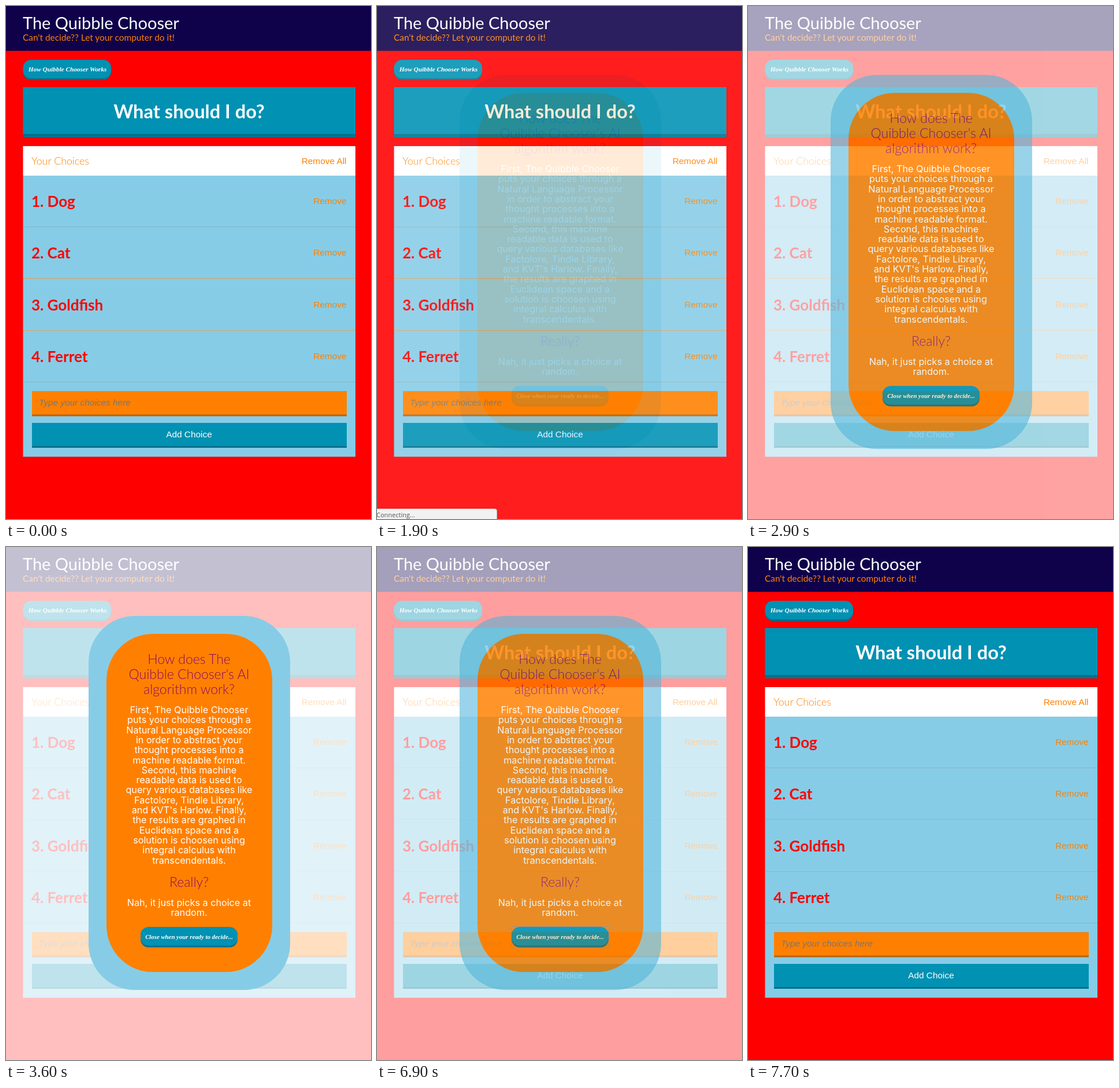
These frames come from a looping animation (632x886 px, 8 s). An HTML page:

```html
<!DOCTYPE html>
<html lang="en">
<head>
<meta charset="utf-8">
<title>Quibble Chooser</title>
<style>
  html, body { margin: 0; width: 100%; height: 100%; overflow: hidden; background: #f00; }
  svg { display: block; width: 100vw; height: 100vh; }
  text { white-space: pre; }
  .title { font-family: Lato, sans-serif; }
  .thin { font-family: Lato, sans-serif; font-weight: 300; }
  .bold { font-family: Lato, sans-serif; font-weight: 700; }
  .script { font: italic 700 11px "Liberation Serif", serif; }
  .ui { font: 15.4px "Liberation Sans", Arial, sans-serif; }
  .hint { font-style: italic; }
  .body { font: 400 16.2px Inter, sans-serif; }
  .status { font: 11px "Open Sans", sans-serif; }
  .mid { text-anchor: middle; }
  .end { text-anchor: end; }
</style>
</head>
<body>
<svg viewBox="0 0 632 886">
  <g id="page"></g>
  <g id="overlay" opacity="0"></g>
  <g id="status" visibility="hidden"></g>
</svg>
<script>
const LOOP = 8000, STEP = 100;
const NAVY = '#10024a', TEAL = '#0091b3', DEEP = '#00708c', SKY = '#87cce6',
      ORANGE = '#ff8000', PLUM = '#8c0a64', RED = '#f00', WHITE = '#fff';

const $ = id => document.getElementById(id);
const page = $('page'), overlay = $('overlay'), status = $('status');

function add(parent, tag, attrs, content = '') {
  const el = document.createElementNS('http://www.w3.org/2000/svg', tag);
  for (const key in attrs) el.setAttribute(key, attrs[key]);
  el.textContent = content;
  parent.appendChild(el);
  return el;
}

const rect = (parent, x, y, width, height, fill, rx = 0) =>
  add(parent, 'rect', { x, y, width, height, fill, rx });

function text(parent, content, x, y, fill, cls, size) {
  const el = add(parent, 'text', { x, y, fill, class: cls }, content);
  if (size) el.style.fontSize = size + 'px';
}

// Box with a darker bottom edge
function button(parent, x, y, w, h, edge, fill = TEAL, dark = DEEP, r = 0) {
  rect(parent, x, y, w, h, dark, r);
  rect(parent, x, y, w, h - edge, fill, r);
}

function drawPage() {
  rect(page, 0, 0, 632, 886, RED);
  rect(page, 0, 0, 632, 77.5, NAVY);
  text(page, 'The Quibble Chooser', 29, 40, WHITE, 'title', 29);
  text(page, "Can't decide?? Let your computer do it!", 29, 60, ORANGE, 'title', 15.4);

  button(page, 29.5, 93, 152.5, 35, 3, TEAL, DEEP, 14);
  text(page, 'How Quibble Chooser Works', 106.5, 113, WHITE, 'script mid', 11.3);

  button(page, 29.5, 140, 575.5, 87, 6);
  text(page, 'What should I do?', 317, 194, WHITE, 'bold mid', 32.6);

  rect(page, 29.5, 242, 575.5, 51, WHITE);
  rect(page, 29.5, 293, 575.5, 485.5, SKY);
  text(page, 'Your Choices', 44, 274, ORANGE, 'thin', 17.8);
  text(page, 'Remove All', 589.5, 273, ORANGE, 'ui end');

  ['Dog', 'Cat', 'Goldfish', 'Ferret'].forEach((name, i) => {
    const y = i * 89.3;
    text(page, `${i + 1}. ${name}`, 44, 347 + y, RED, 'bold', 26);
    text(page, 'Remove', 589.5, 342 + y, ORANGE, 'ui end');
    rect(page, 29.5, Math.round(381 + y), 575.5, 1, i % 3 ? '#d9a263' : '#86b4c5');
  });

  button(page, 45, 665.5, 545, 43, 3, ORANGE, '#b8640e');
  text(page, 'Type your choices here', 57, 690, '#7a7570', 'ui hint');
  button(page, 45, 720, 545, 43, 3);
  text(page, 'Add Choice', 317, 745, WHITE, 'ui mid');
}

function drawOverlay() {
  rect(overlay, 0, 0, 632, 886, 'rgba(255,255,255,.75)');
  rect(overlay, 143, 119, 349, 646, SKY, 80);
  rect(overlay, 174, 150, 287, 584, ORANGE, 80);

  const lines = (list, y, gap, fill, cls, size) => list.forEach((line, i) =>
    text(overlay, line, 317, y + i * gap, fill, cls + ' mid', size));

  lines(['How does The', "Quibble Chooser's AI", 'algorithm work?'], 202, 26, PLUM, 'thin', 23);
  lines([
    'First, The Quibble Chooser', 'puts your choices through a', 'Natural Language Processor',
    'in order to abstract your', 'thought processes into a', 'machine readable format.',
    'Second, this machine', 'readable data is used to', 'query various databases like',
    'Factolore, Tindle Library,', "and KVT's Harlow. Finally,", 'the results are graphed in',
    'Euclidean space and a', 'solution is choosen using', 'integral calculus with',
    'transcendentals.'
  ], 287, 17.3, WHITE, 'body');
  lines(['Really?'], 587, 0, PLUM, 'thin', 23);
  lines(['Nah, it just picks a choice at', 'random.'], 620, 17.3, WHITE, 'body');

  button(overlay, 233, 656.5, 168, 35, 3, TEAL, DEEP, 14);
  text(overlay, 'Close when your ready to decide...', 317, 677, WHITE, 'script mid', 10.8);
  return add(overlay, 'rect', { x: 232.5, y: 655.5, width: 169, height: 37,
    fill: 'none', stroke: '#7d8fa3', 'stroke-opacity': 0.75 });
}

function drawStatus() {
  add(status, 'path', { d: 'M-1 868.5H204Q207.5 868.5 207.5 872V887H-1Z',
    fill: '#f2f2f2', stroke: '#bdbdbd' });
  text(status, 'Connecting...', -1, 883, '#555', 'status');
}

// cubic-bezier(.42, 0, .58, 1)
function easeInOut(p) {
  if (p <= 0) return 0;
  if (p >= 1) return 1;
  let lo = 0, hi = 1, u = 0.5;
  for (let i = 0; i < 24; i++) {
    u = (lo + hi) / 2;
    const v = 1 - u;
    if (3 * v * v * u * 0.42 + 3 * v * u * u * 0.58 + u ** 3 < p) lo = u;
    else hi = u;
  }
  return u * u * (3 - 2 * u);
}

const FADE = 2200, OPEN = 1300, CLOSE = 6270, REMOVED = 7700;

function fade(t) {
  if (t >= REMOVED) return 0;
  return easeInOut((t - OPEN) / FADE) - easeInOut((t - CLOSE) / FADE);
}

drawPage();
const ring = drawOverlay();
drawStatus();

const show = (el, on) => el.setAttribute('visibility', on ? 'visible' : 'hidden');

function frame() {
  const t = Math.floor(performance.now() % LOOP / STEP) * STEP;
  overlay.setAttribute('opacity', fade(t));
  show(ring, t >= 6200);
  show(status, t >= 1100 && t < 2300);
  requestAnimationFrame(frame);
}
frame();
</script>
</body>
</html>
```
